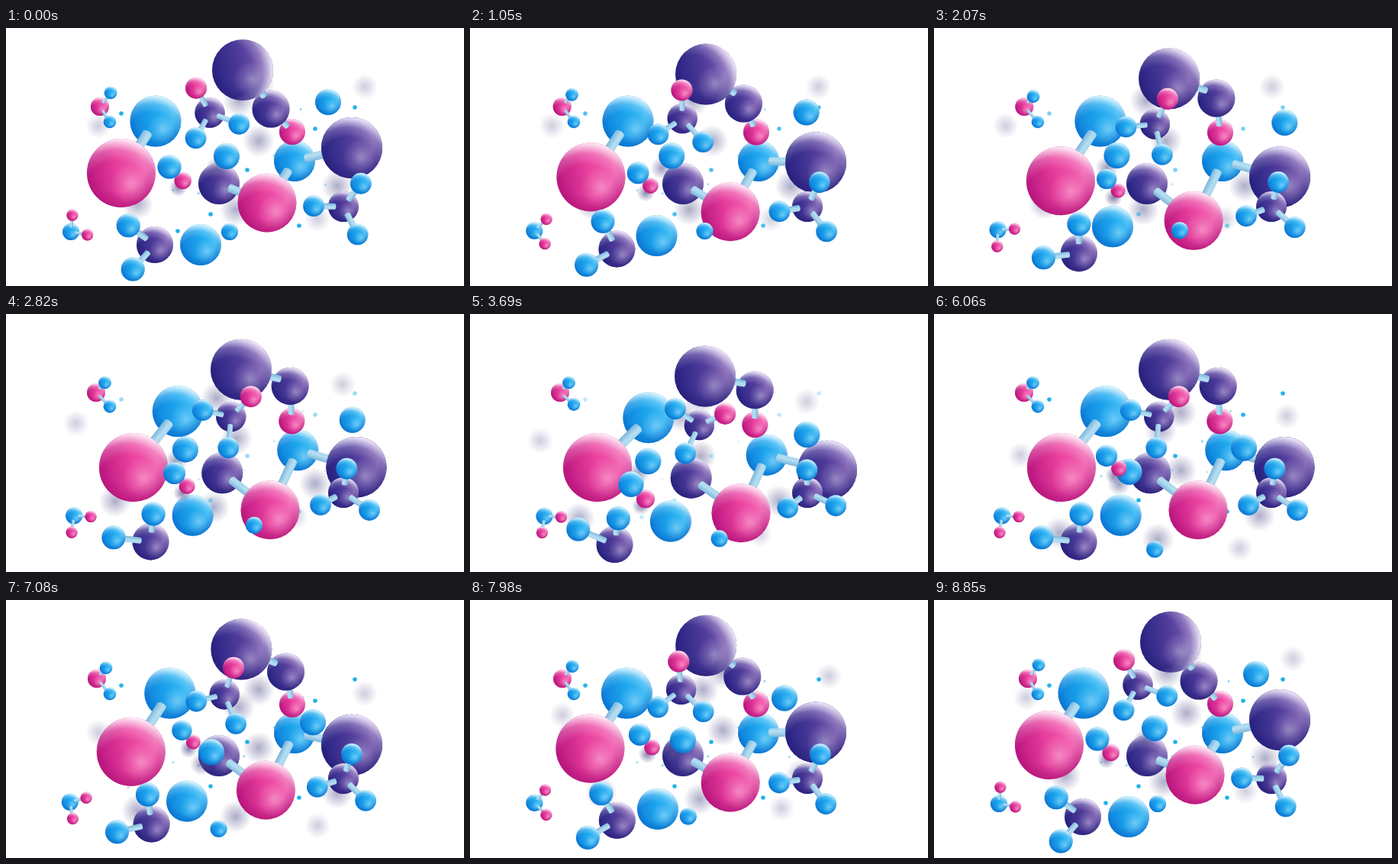
An HTML page with a canvas that plays this animation: 600x338 px, repeating every 9 s.

```html
<!DOCTYPE html>
<html lang="en">
<head>
<meta charset="utf-8">
<title>Molecules</title>
<style>
html, body { margin: 0; width: 100%; height: 100%; overflow: hidden; background: #fff; }
canvas { display: block; width: 600px; height: 338px; }
</style>
</head>
<body>
<canvas id="stage" width="600" height="338"></canvas>
<script>
const ctx = document.getElementById('stage').getContext('2d');
const LOOP = 9000, STEPS = 60, TICK = 30, TICKS_PER_STEP = 300 / 61;

const PAINT = {
  pink:   { dark: '#c01a83', mid: '#ea429f', lit: '#f364b2', edge: '176,18,120', glow: '255,240,249' },
  blue:   { dark: '#0f84dc', mid: '#1fa7ee', lit: '#3cbdf6', edge: '8,104,200', glow: '228,248,255' },
  purple: { dark: '#2b2585', mid: '#503c9a', lit: '#8565b6', edge: '38,30,120', glow: '242,236,252' }
};

// turn runs 0 to 1 in the first quarter, drift in the second; both then run back
let step = 0, turn = 0, drift = 0;

function setStep(n) {
  step = n % STEPS;
  const swing = Math.min(step, STEPS - step) / 15;
  turn = Math.min(swing, 1);
  drift = Math.max(swing - 1, 0);
}

function move(x, y, [tx, ty] = [0, 0], [dx, dy] = [0, 0]) {
  return [x + tx * turn + dx * drift, y + ty * turn + dy * drift];
}

// Straight runs through four corners, one quarter loop each
function circuit(...corners) {
  const i = Math.floor(step / 15), f = step / 15 - i;
  const from = corners[i], to = corners[(i + 1) % 4];
  return from.map((v, n) => v + (to[n] - v) * f);
}

function ball(color, r, [x, y], rim = 0) {
  return { color, r, x, y, rim };
}

// Ball on an arm of a star, at an angle in degrees
function arm(color, r, center, length, degrees) {
  const a = degrees * Math.PI / 180;
  return ball(color, r, [center.x + length * Math.cos(a), center.y + length * Math.sin(a)]);
}

function disc(x, y, r, fill) {
  ctx.fillStyle = fill;
  ctx.beginPath();
  ctx.arc(x, y, r, 0, Math.PI * 2);
  ctx.fill();
}

// Radial fade of one colour; stops are pairs of offset and alpha
function fade(x, y, inner, outer, rgb, ...stops) {
  const g = ctx.createRadialGradient(x, y, inner, x, y, outer);
  for (const [offset, alpha] of stops) g.addColorStop(offset, `rgba(${rgb},${alpha})`);
  return g;
}

function drawBall({ color, r, x, y, rim }) {
  const { dark, mid, lit, edge, glow } = PAINT[color];
  ctx.save();
  ctx.translate(x, y);
  const body = ctx.createLinearGradient(-r * .9, r * .15, r * .9, -r * .15);
  body.addColorStop(0, dark);
  body.addColorStop(.5, mid);
  body.addColorStop(1, lit);
  disc(0, 0, r, body);
  disc(0, 0, r, fade(-r * .05, -r * .2, r * .75, r * 1.2, edge, [0, 0], [1, .75]));
  disc(0, 0, r, fade(r * .28, r * .3, 0, r * .6, '255,255,255', [0, .34], [.45, .15], [1, 0]));
  ctx.rotate(rim);
  disc(0, 0, r, fade(-r * .15, r * .6, r * .95, r * 1.6, glow, [0, 0], [.5, .24], [1, .97]));
  ctx.restore();
}

// Rod rooted on the face of a, running to the middle of b
function bond(a, b, width) {
  const length = Math.hypot(b.x - a.x, b.y - a.y);
  const h = width / 2, start = a.r * .58;
  ctx.save();
  ctx.translate(a.x, a.y);
  ctx.rotate(Math.atan2(b.y - a.y, b.x - a.x));
  const g = ctx.createLinearGradient(0, -h, 0, h);
  g.addColorStop(0, '#a9d6ec');
  g.addColorStop(.4, '#b4def2');
  g.addColorStop(1, '#7db6da');
  ctx.fillStyle = g;
  ctx.beginPath();
  ctx.moveTo(length, -h);
  ctx.lineTo(start, -h);
  ctx.ellipse(start, 0, h * .5, h, 0, -Math.PI / 2, Math.PI / 2, true);
  ctx.lineTo(length, h);
  ctx.fill();
  ctx.restore();
}

function star(center, width, ...arms) {
  drawBall(center);
  arms.forEach(a => bond(center, a, width));
  arms.forEach(drawBall);
}

function shade(x, y, r, alpha) {
  disc(x, y, r, fade(x, y, 0, r, '92,90,146', [0, alpha], [.45, alpha * .55], [1, 0]));
}

function drawShades() {
  const [dx, dy] = circuit([0, 0], [-29, 0], [-29, 57], [0, 57]);
  const faint = [[121, 128], [470, 77], [408, 250]];
  const deep = [[331, 148], [434, 207], [301, 238], [172, 230], [305, 95], [331, 72]];
  for (const [x, y] of faint) shade(x + dx, y + dy, 17, .3);
  for (const [x, y] of deep) shade(x + dx, y + dy, 21, .5);
}

function seeded(seed) {
  return () => (seed = seed * 16807 % 2147483647) / 2147483647;
}

// Drops fade out slowly and come back fast; specks are scattered between them
function drawDots() {
  const drops = [[151, 112], [457, 104], [405, 132], [316, 186], [225, 266], [268, 244], [384, 259]];
  const random = seeded(7);
  ctx.globalAlpha = step < 35 ? 1 - step / 35 : Math.min(1, (step - 35) / 6);
  for (const [x, y] of drops) disc(x, y, 2.8, '#22b2ea');
  for (let i = 0; i < 9; i++) {
    disc(160 + 280 * random(), 85 + 175 * random(), 1 + random() * .8, '#8ad8f5');
  }
  ctx.globalAlpha = 1;
}

function drawLeftPair() {
  const blue = ball('blue', 33.5, move(196, 122, [23.5, 0], [21.5, 20.5]));
  const pink = ball('pink', 45, move(151, 190, [16, 11]));
  drawBall(blue);
  bond(blue, pink, 13);
  drawBall(pink);
}

function drawRing() {
  const back = [16, 16], front = [22.5, 10];
  const hub = ball('blue', 27, move(378, 174, [0, 0], back));
  const side = ball('purple', 27, move(279, 204, [0, 0], back));
  const right = ball('purple', 40 - drift * 1.5, move(453, 157, [0, 41], front));
  const pink = ball('pink', 38.5, move(342, 229, [-2, 25], front));
  drawBall(hub);
  drawBall(side);
  drawBall(right);
  bond(hub, right, 11);
  drawBall(right);
  bond(hub, pink, 12);
  bond(side, pink, 11);
  drawBall(pink);
}

function drawTopChain() {
  const top = ball('purple', 40, move(310, 55, [-2, 12], [0, 21.7]), 1.3 - 1.1 * turn);
  const mid = ball('purple', 24.5, move(347, 106, [24.5, -15], [2.5, 13]));
  const tail = ball('pink', 17, move(375, 136, [0, 1], [-2.5, 12]));
  drawBall(tail);
  bond(tail, mid, 8);
  drawBall(mid);
  bond({ ...mid, y: mid.y - 6 }, top, 9);
  drawBall(top);
}

function drawLooseBalls() {
  drawBall(ball('blue', 27, move(255, 284, [-22.5, -25.5], [45.5, 19.5])));
  drawBall(ball('blue', 17, circuit([422, 97], [462, 126], [431, 174], [397, 176])));
  drawBall(ball('blue', 11, circuit([293, 267], [324, 265], [328, 309], [275, 308])));

  const drop = ball('blue', 17, circuit([289, 168], [236, 167], [232, 206], [264, 207]));
  shade(drop.x - 13, drop.y + 16, 15, .6);
  drawBall(drop);

  // This pair grows as it nears the viewer
  const [x, y, r] = circuit([214, 182, 15.5], [227, 199, 13], [203, 235, 18.5], [234.5, 168, 12.5]);
  const pink = ball('pink', r * .72, [x + r * 1.14, y + r * 1.16]);
  shade(pink.x - 6, pink.y + 9, 12, .75);
  drawBall(pink);
  drawBall(ball('blue', r, [x, y]));
}

function drawStars() {
  star(ball('pink', 12, move(123, 103, [-5, 0])), 4,
    ball('blue', 8.3, move(137, 85, [-7.5, 5])),
    ball('blue', 8.3, move(136, 123, [0, 0], [0, -7])));

  const tiny = ball('blue', 11, move(85, 267, [-1.5, -3], [21, 1]));
  star(tiny, 4, ...[-85, 10].map(a => arm('pink', 7.6, tiny, 22, a + 88 * turn)));

  const low = ball('purple', 24, move(195, 284, [-5.5, 12], [0, 9]));
  star(low, 8,
    arm('blue', 15.5, low, 43 + 4 * turn + 7 * drift, 132 + 44 * turn + 40 * drift),
    arm('blue', 15.5, low, 43 - 5 * turn - 5 * drift, 216 + 58 * turn + 6 * drift));

  const upper = ball('purple', 19.7, move(267, 111, [24, 16], [14, 28]));
  const spin = 59.5 * turn + 53.5 * drift;
  star(upper, 7,
    arm('pink', 14, upper, 37, spin - 119),
    arm('blue', 13.8, upper, 38, spin + 119),
    arm('blue', 13.8, upper, 41, spin + 21));

  const lower = ball('purple', 20, [442, 234]);
  const sway = -23 * (turn + drift);
  star(lower, 8,
    arm('blue', 13.8, lower, 39 - 4 * (turn + drift), sway + 181),
    arm('blue', 13.8, lower, 38 - 5 * (turn + drift), sway - 53),
    arm('blue', 13.8, lower, 41, sway + 63));
}

function draw() {
  ctx.fillStyle = '#fff';
  ctx.fillRect(0, 0, 600, 338);
  drawShades();
  drawDots();
  drawLeftPair();
  drawRing();
  drawTopChain();
  drawLooseBalls();
  drawStars();
}

// The picture is held between steps, each four or five ticks long
function stepAt(time) {
  const tick = Math.floor((time % LOOP) / TICK);
  return Math.ceil((tick + .25) / TICKS_PER_STEP) - 1;
}

const begin = performance.now();
function frame() {
  setStep(stepAt(performance.now() - begin));
  draw();
  requestAnimationFrame(frame);
}
frame();
</script>
</body>
</html>
```
